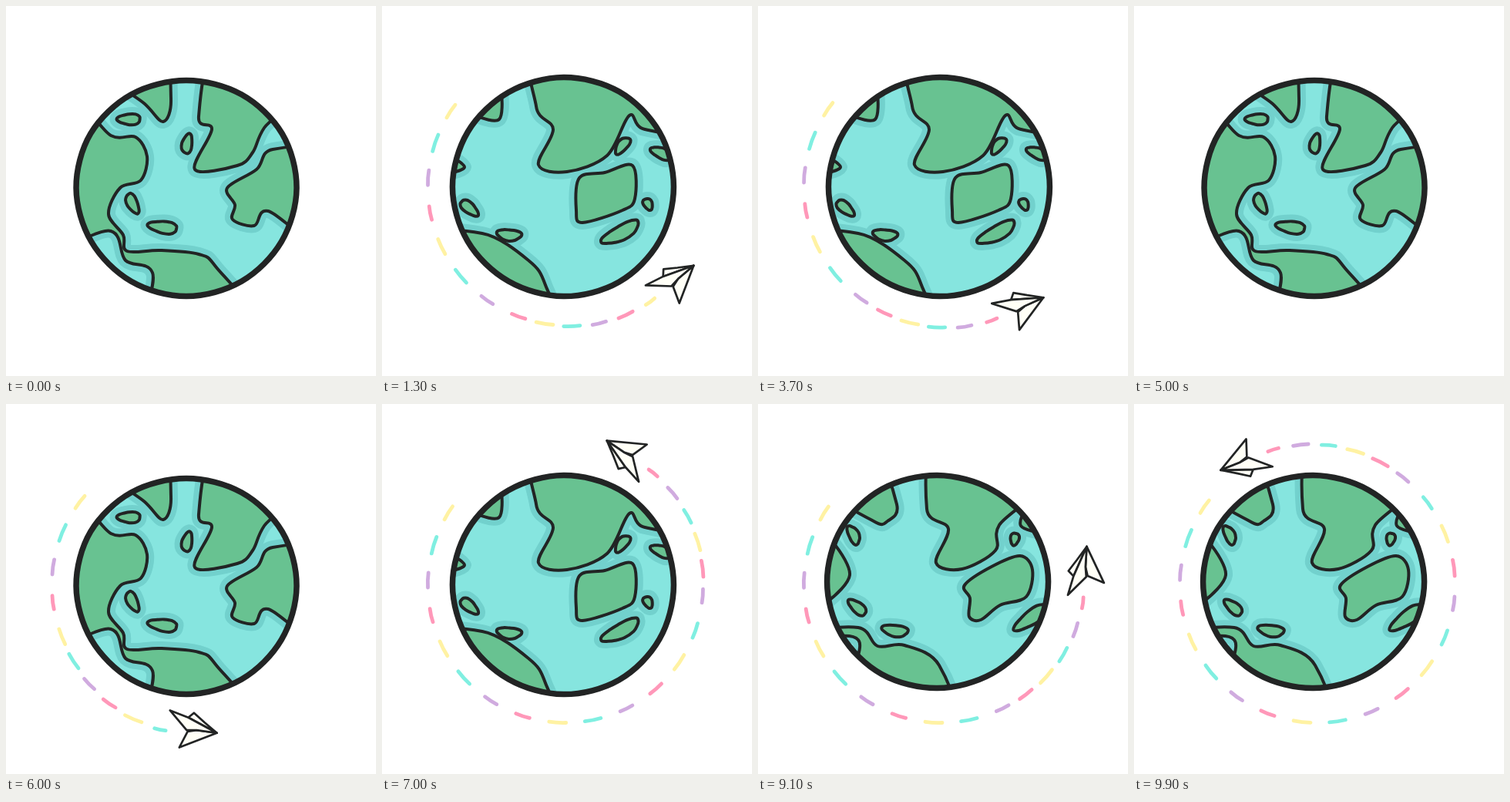
An HTML page with a canvas that plays this animation: 480x480 px, repeating every 10000 ms.

```html
<!DOCTYPE html>
<html lang="en">
<head>
<meta charset="utf-8">
<title>Paper plane around the globe</title>
<style>
html, body { margin: 0; width: 100%; height: 100%; overflow: hidden; background: #fff; }
canvas { display: block; width: 480px; height: 480px; }
</style>
</head>
<body>
<canvas id="stage" width="480" height="480"></canvas>
<script>
const ctx = document.getElementById('stage').getContext('2d');
const INK = '#222424', SEA = '#86e5df', SHALLOW = '#72d1cd', LAND = '#68c291', PAPER = '#fffff6';
const DASH_COLORS = ['#fff2a3', '#80efe1', '#d0abdf', '#ff98b9'];
const STEP = 100, STEPS = 25, HOLD = 3;
const rad = deg => deg * Math.PI / 180;

// Smooth closed curve through a few key points.
function smooth(pts) {
  const n = pts.length, path = new Path2D();
  path.moveTo(...pts[0]);
  pts.forEach((b, i) => {
    const a = pts[(i + n - 1) % n], c = pts[(i + 1) % n], d = pts[(i + 2) % n];
    path.bezierCurveTo(
      b[0] + (c[0] - a[0]) / 6, b[1] + (c[1] - a[1]) / 6,
      c[0] - (d[0] - b[0]) / 6, c[1] - (d[1] - b[1]) / 6, ...c);
  });
  path.closePath();
  return path;
}

// A ring of points with a slight three-lobed, hand-drawn wobble.
function ring(x, y, rx, ry, tilt, wobble) {
  const t = rad(tilt), pts = [];
  for (let a = 0; a < 360; a += 30) {
    const r = 1 + wobble * Math.cos(3 * rad(a) + x);
    const u = rx * r * Math.cos(rad(a)), v = ry * r * Math.sin(rad(a));
    pts.push([x + u * Math.cos(t) - v * Math.sin(t), y + u * Math.sin(t) + v * Math.cos(t)]);
  }
  return smooth(pts);
}

const numbers = text => text.split(',').map(Number);

// Coast points lying on the rim are pushed past it, so the clip trims the land.
function pose(cx, cy, rx, ry, coasts, isles) {
  const push = ([x, y]) => {
    const f = Math.hypot(x - cx, y - cy) > 136.5 ? 1.35 : 1;
    return [cx + (x - cx) * f, cy + (y - cy) * f];
  };
  const lands = coasts.map(c => smooth(c.split(' ').map(p => push(numbers(p)))));
  const islands = isles.split(' ').map(i => {
    const [x, y, half, tilt] = numbers(i);
    return ring(x, y, half, 4 + half / 5, tilt, 0.1);
  });
  return { rim: ring(cx, cy, rx, ry, 0, 0.004), shores: [...lands, ...islands] };
}

// The globe turns through three drawings.
const poses = [
  pose(234, 236, 143, 140, [
    '155,121 180,127 204,150 214,120 209,97',
    '120,155 136,168 168,170 183,195 175,226 148,236 133,270 152,297 157,318 200,317 250,322 272,338 295,364 203,373 190,346 155,330 136,292 104,283',
    '266,97 250,143 267,160 245,212 300,207 320,190 335,158 341,138',
    '374,205 346,186 325,212 287,236 297,258 294,277 322,285 340,266 363,286'
  ], '160,147,15,0 235,179,13,100 164,256,14,65 204,287,19,8'),
  pose(235.5, 234.5, 143.5, 142, [
    '214,92 200,130 222,160 203,206 240,215 292,194 321,142 341,160 372,181',
    '126,147 152,147 166,109',
    '98,194 107,209 96,223',
    '102,287 130,295 190,330 212,362 228,378',
    '256,223 289,216 325,207 328,250 312,265 260,281 252,265'
  ], '312,181,13,-50 310,294,27,-28 345,257,8,60 113,262,14,40 165,297,16,5 362,191,14,25'),
  pose(232.5, 230.5, 143.5, 138, [
    '236,92 219,136 247,162 231,206 265,214 308,190 313,157 331,130',
    '126,139 150,152 168,152 180,130 169,105',
    '106,174 119,222 96,262',
    '268,235 303,211 340,197 356,215 348,250 314,261 289,280 274,276 275,252',
    '341,136 341,158 369,181',
    '100,279 130,290 155,314 190,313 235,339 247,371 152,348 130,306 101,288'
  ], '124,170,13,65 333,175,8,100 129,264,14,40 178,294,17,8 355,277,26,-35')
];

function stroke(path, color, width) {
  ctx.strokeStyle = color;
  ctx.lineWidth = width;
  ctx.stroke(path);
}

function fill(path, color) {
  ctx.fillStyle = color;
  ctx.fill(path);
}

function drawGlobe({ rim, shores }) {
  ctx.save();
  ctx.clip(rim);
  fill(rim, SEA);
  shores.forEach(s => stroke(s, SHALLOW, 18));
  shores.forEach(s => {
    fill(s, LAND);
    stroke(s, INK, 4);
  });
  ctx.restore();
  stroke(rim, INK, 7.5);
}

// Angles are degrees counter-clockwise from the top.
const polar = (deg, r) => [238 - r * Math.sin(rad(deg)), 235 - r * Math.cos(rad(deg))];

// The plane slows down gently on its way round.
const noseAngle = k => 18 + 18.2 * k - 0.095 * k * k;

// One dash per step; the newest sit closer together and further out.
function drawTrail(k) {
  const last = noseAngle(k) - 22;
  const drift = 1.4 * (1 + 2 * Math.max(0, 1 - Math.abs(k - 8) / 4));
  const base = k < 10 ? 173 : 178.5;
  for (let i = 0; i < k; i++) {
    const age = k - 1 - i;
    const angle = last - 11.3 * Math.min(age, 5) - 14.8 * Math.max(age - 5, 0);
    const r = base + Math.max(0, 4.5 - age) * drift;
    const half = age ? 3.2 + 0.4 * Math.sin(i * 1.7) : 2.2;
    const dash = new Path2D();
    dash.moveTo(...polar(angle - half, r));
    dash.quadraticCurveTo(...polar(angle, r + 0.7), ...polar(angle + half, r));
    stroke(dash, DASH_COLORS[i % 4], 4.8);
  }
}

// Paper facets around the nose at 0,0, as seen at PLANE_ANGLE.
const PLANE_ANGLE = 43;
const facets = ['M0 0L42 -3L39 6L21 3Z', 'M0 0L31 -42L33 -19L24 -11Z', 'M0 0L24 -11L35 -18L67 -8L42 -3Z']
  .map(d => new Path2D(d));

function drawPlane(k) {
  const angle = noseAngle(k);
  ctx.save();
  ctx.translate(...polar(angle, 195));
  ctx.rotate(rad(PLANE_ANGLE - angle));
  facets.forEach(f => {
    fill(f, PAPER);
    stroke(f, INK, 2.7);
  });
  ctx.restore();
}

function draw(now) {
  const k = Math.floor(now / STEP) % STEPS;
  ctx.fillStyle = '#fff';
  ctx.fillRect(0, 0, 480, 480);
  ctx.lineCap = ctx.lineJoin = 'round';
  drawGlobe(poses[Math.floor((k + 1) / HOLD) % poses.length]);
  if (k) {
    drawTrail(k);
    drawPlane(k);
  }
}

const start = performance.now();
function tick() {
  draw(performance.now() - start);
  requestAnimationFrame(tick);
}
tick();
</script>
</body>
</html>
```
